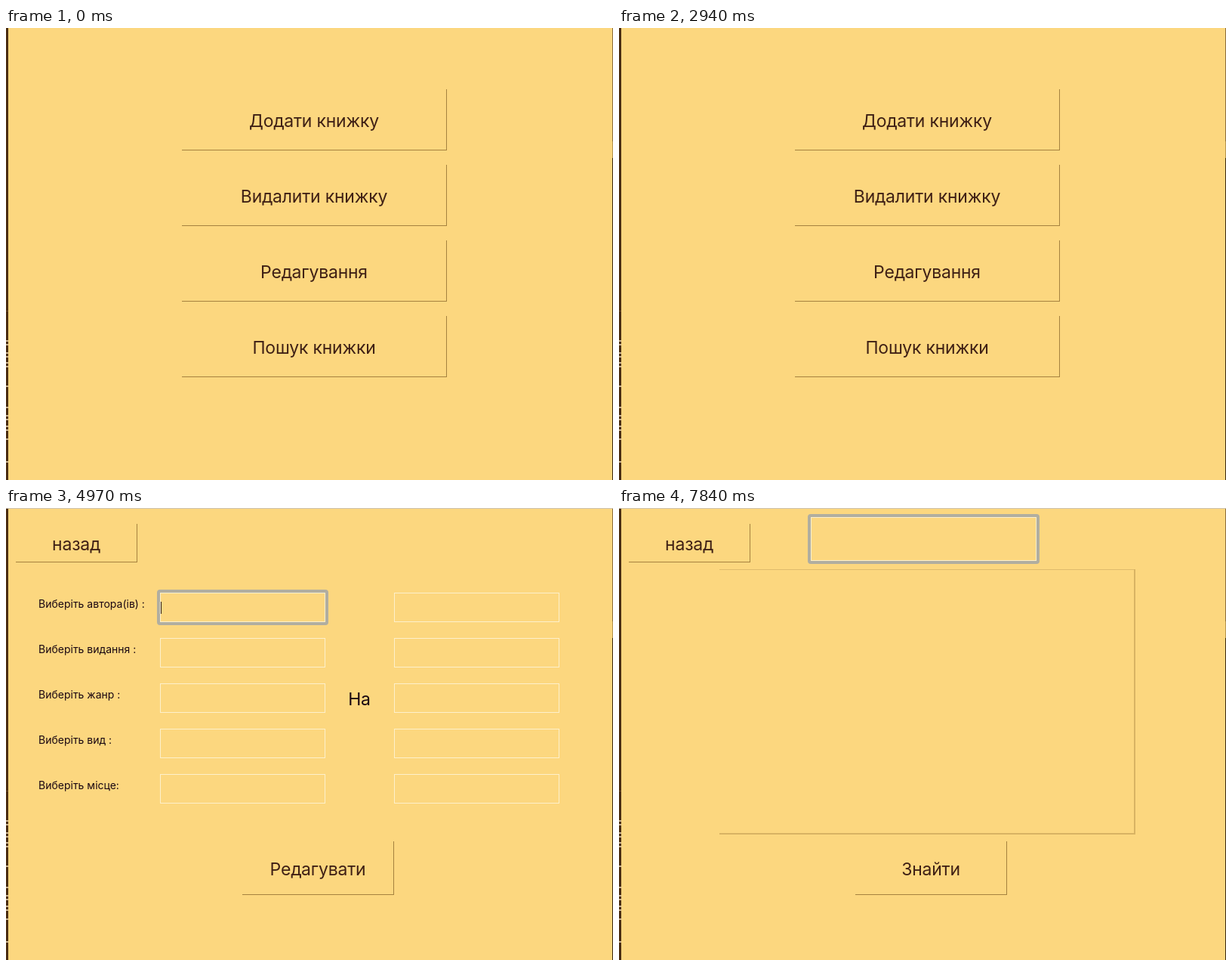
Write an HTML page with a canvas that moves like this. It is 804x598 px and loops after 8 s.

```html
<!DOCTYPE html>
<html lang="uk">
<meta charset="utf-8">
<title>Книжки</title>
<style>
html, body { margin: 0; width: 100%; height: 100%; overflow: hidden; background: #fcd77f }
canvas { display: block }
</style>
<canvas id="stage" width="804" height="598"></canvas>
<script>
const LOOP = 8000;
const c = document.getElementById('stage').getContext('2d');
const LINE = '#a5823f', BROWN = '#3f2015', INK = '#1a0712', FIELD = '#fdf0cb';
const KINDS = ['автора(ів) :', 'видання :', 'жанр :', 'вид :', 'місце:'];
const MENU = ['Додати книжку', 'Видалити книжку', 'Редагування', 'Пошук книжки'];

// Each visit: menu item, press time, page opens, back pressed, menu returns, caret hidden from / to
const VISITS = [
  { item: 0, press: 1260, open: 1400, back: 2310, close: 2450, off: [LOOP, LOOP] },
  { item: 1, press: 3150, open: 3290, back: 3920, close: 4060, off: [3790, 4060] },
  { item: 2, press: 4830, open: 4970, back: 6160, close: 6300, off: [5470, 5970] },
  { item: 3, press: 7140, open: 7280, back: LOOP, close: LOOP, off: [7770, LOOP] }
];

function rect(x, y, w, h, color) {
  c.fillStyle = color;
  c.fillRect(x, y, w, h);
}

function text(s, x, y, { size = 23, color = BROWN, align = 'center' } = {}) {
  c.font = `${size}px Inter, sans-serif`;
  c.letterSpacing = size > 20 ? '-0.2px' : '0px';
  c.textAlign = align;
  c.fillStyle = color;
  c.fillText(s, x, y);
}

function button(s, x, y, w, h, down) {
  if (down) {
    rect(x, y, w, 1, LINE);
    rect(x, y, 1, h, LINE);
  } else {
    rect(x + w, y, 1, h + 1, LINE);
    rect(x, y + h, w + 1, 1, LINE);
  }
  text(s, x + w / 2, y + h / 2 + (h > 60 ? 10 : 9.5));
}

function frame(x, y, w, h, color = FIELD) {
  c.strokeStyle = color;
  c.lineWidth = 1;
  c.strokeRect(x + .5, y + .5, w - 1, h - 1);
}

function focusRing(x, y, w, h) {
  c.strokeStyle = '#b1aea0';
  c.lineWidth = 4;
  c.beginPath();
  c.roundRect(x - 2, y - 2, w + 4, h + 4, 2);
  c.stroke();
  frame(x, y, w, h);
}

function caret(x, y, alpha) {
  c.globalAlpha = alpha;
  rect(x, y, 1, 16, '#2a1a14');
  c.globalAlpha = 1;
}

function column(x, w, focused) {
  KINDS.forEach((_, i) => {
    if (focused && !i) focusRing(x, 112, w, 39);
    else frame(x, 112 + i * 60, w, 39);
  });
}

function form(action, size, x, w, caretAlpha) {
  KINDS.forEach((kind, i) => text('Виберіть ' + kind, 43, (size > 20 ? 136 : 132) + i * 60,
    { size, color: INK, align: 'left' }));
  column(x, w, true);
  caret(x + 1, 124, caretAlpha);
  button(action, 313, 441, 200, 70);
}

function search(caretAlpha) {
  focusRing(254, 12, 299, 58);
  caret(255, 33, caretAlpha);
  rect(133, 81, 550, 1, '#dfbb6c');
  rect(682, 81, 2, 350, '#d8b363');
  rect(133, 430, 551, 2, '#d8b363');
  button('Знайти', 313, 441, 200, 70);
}

// Slivers of the windows behind the app
function edges() {
  rect(0, 0, 3, 598, '#4a2d12');
  rect(0, 374, 3, 1, '#6b4c2a');
  for (const y of [413, 418, 429, 434, 442, 447, 473, 501, 512, 517, 526, 531, 543, 573])
    rect(0, y, 3, 2, '#c9b391');
  rect(803, 0, 1, 150, '#8a6c3c');
  rect(803, 150, 1, 22, '#b39350');
  rect(803, 172, 1, 426, '#3a2812');
}

function draw(t) {
  const visit = VISITS.find(v => t >= v.press && t < v.close);
  const open = visit && t >= visit.open;
  rect(0, 0, 804, 598, '#fcd77f');
  edges();
  if (!open) {
    MENU.forEach((s, i) => button(s, 233, 81 + i * 100, 350, 80, visit && visit.item === i));
    return;
  }
  rect(0, 0, 804, 1, '#cdc5b8');
  button('назад', 13, 21, 160, 50, t >= visit.back);
  const [from, to] = visit.off;
  const alpha = t < from || t >= to ? 1 : Math.max(0, 1 - (t - from + 35) / 70);
  if (visit.item === 3) search(alpha);
  else if (visit.item === 2) {
    form('Редагувати', 14, 204, 219, alpha);
    column(514, 219);
    text('На', 468, 261, { color: INK });
  } else form(visit.item ? 'Видалити' : 'Додати', 23, 274, 279, alpha);
}

const start = performance.now();
function tick() {
  draw((performance.now() - start) % LOOP);
  requestAnimationFrame(tick);
}
tick();
</script>
</html>
```
